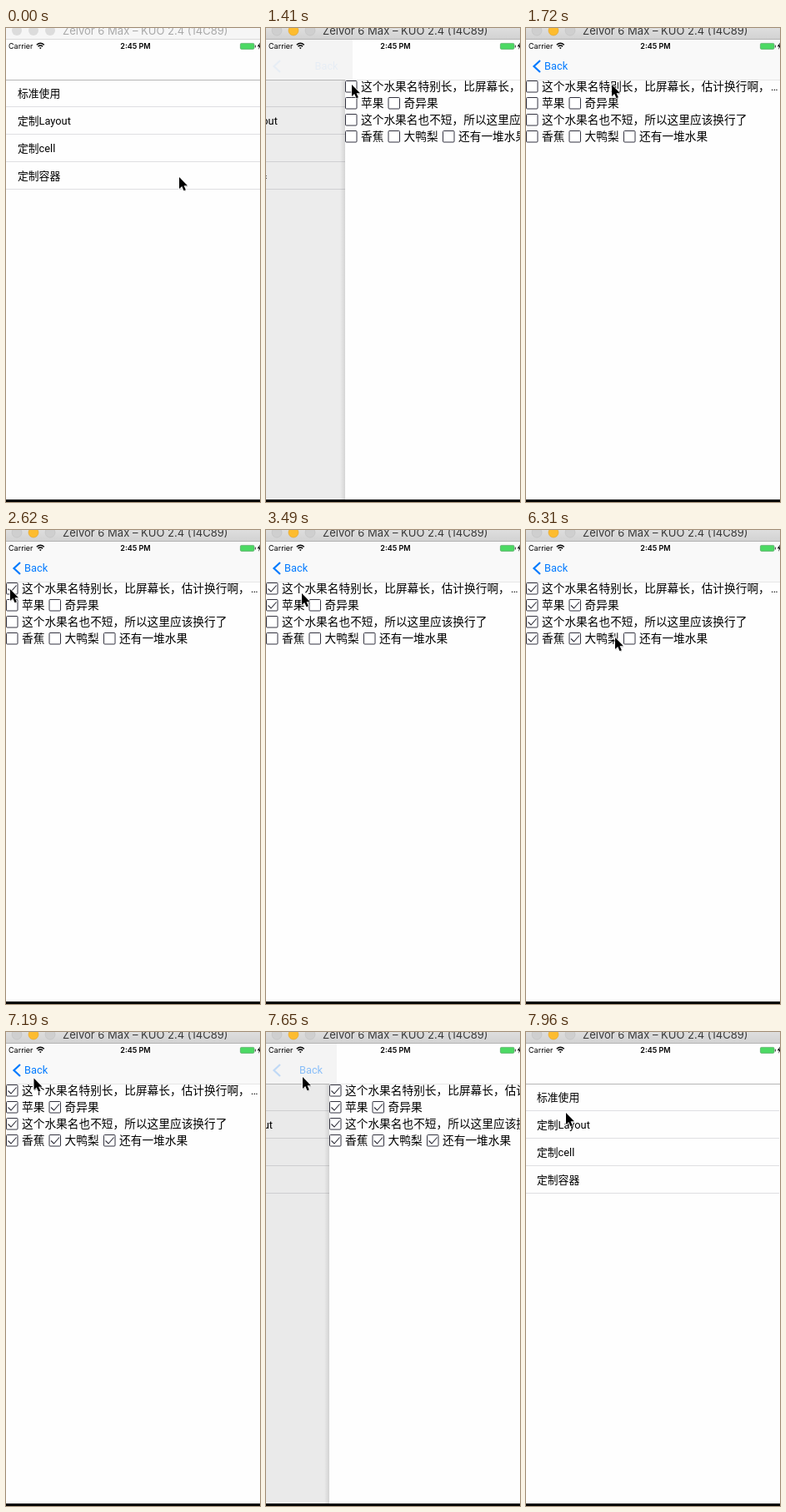
Write an HTML page that moves like this. It is 305x569 px and loops after 8 s.

```html
<!DOCTYPE html>
<html lang="zh">
<head>
<meta charset="utf-8">
<title>Checkbox list demo</title>
<style>
html, body { margin: 0; width: 100%; height: 100%; overflow: hidden; background: #fff; }
svg { display: block; width: 305px; height: 569px; }
text { white-space: pre; }
.ui { font: 12.8px Roboto, "Noto Sans CJK SC", "Noto Sans CJK", sans-serif; }
.item { font: 13.7px "Noto Sans CJK SC", "Noto Sans CJK", sans-serif; }
.status { font: 9px Inter, sans-serif; }
.title { font: 13px Inter, sans-serif; fill: #a9a9a9; }
.lamp { fill: #dcdcdc; }
.bar { fill: #f6f6f6; }
.rim { fill: #dadada; }
.active .title { fill: #383838; }
.active .bar { fill: url(#chrome); }
.active .rim { fill: #b4b4b4; }
.active .lamp { fill: #cfcfcf; stroke: #c0c0c0; stroke-width: .6; }
.active .mid { fill: #fdbc2f; stroke: #e0a12a; }
.box { fill: #fff; stroke: #333340; }
.tick { fill: none; stroke: #2c2c38; stroke-width: 1.1; }
</style>
</head>
<body>
<svg viewBox="0 0 305 569">
  <defs>
    <linearGradient id="chrome" x2="0" y2="1">
      <stop stop-color="#dedede"/><stop offset="1" stop-color="#d2d2d2"/>
    </linearGradient>
    <linearGradient id="shade">
      <stop stop-color="#000" stop-opacity="0"/><stop offset="1" stop-color="#000" stop-opacity=".1"/>
    </linearGradient>
  </defs>
  <rect width="305" height="569" fill="#fefefe"/>

  <g id="list"></g>
  <rect id="dim" y="63" width="305" height="503"/>
  <rect y="62" width="305" height="1" fill="#b6b6b6"/>

  <g id="page">
    <rect x="-6" y="63" width="6" height="503" fill="url(#shade)"/>
    <rect y="62" width="306" height="504" fill="#fefefe"/>
    <rect y="62" width="306" height="1" fill="#e6e6e6"/>
    <g id="items"></g>
  </g>

  <rect id="navBg" y="14" width="305" height="48" fill="#f9f9f9"/>
  <rect id="navDim" y="14" height="48" opacity=".04"/>
  <path id="chevron" d="M17 39L9.5 46L17 53" fill="none" stroke="#007aff" stroke-width="2.2"/>
  <text id="back" class="ui" x="22" y="50" fill="#007aff">Back</text>

  <g class="status">
    <text x="3" y="25">Carrier</text>
    <text x="155.5" y="25" text-anchor="middle" font-weight="600">2:45 PM</text>
  </g>
  <g fill="none" stroke="#000" stroke-width="1.4">
    <path d="M36.8 20.2Q41.3 16.2 45.8 20.2M38.5 22.1Q41.3 19.7 44.1 22.1"/>
    <path d="M41.3 25.2L39.9 23.7Q41.3 22.6 42.7 23.7Z" fill="#000" stroke="none"/>
  </g>
  <rect x="281.4" y="18.4" width="16.6" height="7" rx="1.3" fill="#4cd964" stroke="#58a866" stroke-width=".7"/>
  <rect x="298.8" y="20.5" width="1.2" height="3" rx=".5" fill="#555"/>
  <path d="M305 17.5L301.8 22.3H304L303 26L306 21.2H304.3Z"/>

  <g id="chromeBar">
    <rect class="bar" width="305" height="13"/>
    <rect class="rim" y="13" width="305" height="1"/>
    <circle class="lamp" cx="13" cy="3" r="6"/>
    <circle class="lamp mid" cx="33" cy="3" r="6"/>
    <circle class="lamp" cx="53" cy="3" r="6"/>
    <text class="title" x="68" y="8">Zelvor 6 Max – KUO 2.4 (14C89)</text>
  </g>
  <rect y="566" width="305" height="3"/>
  <g id="cursor">
    <path d="M.5 1.5V15.5L3.7 12.5L6 17.5L8.3 16.5L6 11.7H10.5Z" opacity=".2"/>
    <path d="M0 0V14L3.2 11L5.5 16.2L7.9 15.2L5.6 10.2H10Z" stroke="#fff" stroke-width="1.4" paint-order="stroke"/>
  </g>
</svg>
<script>
const LOOP = 8000, WIDTH = 305;
const $ = id => document.getElementById(id);

$('list').innerHTML = ['标准使用', '定制Layout', '定制cell', '定制容器'].map((label, i) => {
  const y = 94 + i * 33;
  return `<text class="ui" x="14" y="${y - 11}">${label}</text>
    <rect y="${y}" width="${WIDTH}" height="1" fill="#dfdfe2"/>`;
}).join('');

// x, row, label, time of ticking
const items = [
  [0, 0, '这个水果名特别长，比屏幕长，估计换行啊，', 2620],
  [0, 1, '苹果', 3090],
  [51.5, 1, '奇异果', 3940],
  [0, 2, '这个水果名也不短，所以这里应该换行了', 4770],
  [0, 3, '香蕉', 5250],
  [51.5, 3, '大鸭梨', 5600],
  [117, 3, '还有一堆水果', 6710]
];
$('items').innerHTML = items.map(([x, row, label]) =>
  `<g transform="translate(${x} ${63 + row * 20})">
    <rect class="box" x=".5" y=".5" width="13.5" height="13.5" rx="1"/>
    <path class="tick" d="M2.5 7.5L6 11L12.5 3.5"/>
    <text class="item" x="19" y="12.2">${label}</text>
  </g>`).join('') + '<text class="ui" x="294" y="74.5">…</text>';
const ticks = document.querySelectorAll('.tick');

// start, end, steps, then the points passed on the way
const moves = [
  [350, 820, 8, [150, 108], [95, 52], [103, 68]],
  [1870, 2620, 13, [60, 74], [5, 71]],
  [2680, 2910, 4, [5, 84]],
  [3090, 3490, 7, [8, 85], [43, 76]],
  [3557, 3890, 6, [94, 100], [58, 90]],
  [3940, 4120, 4, [58, 96]],
  [4300, 4480, 4, [10, 107]],
  [4770, 4950, 3, [10, 127]],
  [5250, 5360, 3, [58, 135]],
  [5600, 5780, 3, [58, 131]],
  [6020, 6296, 5, [107, 129]],
  [6365, 6710, 6, [118, 128]],
  [6890, 7300, 8, [75, 90], [30, 56], [44, 54]],
  [7710, 7960, 5, [48, 97]]
];

function along(points, f) {
  const s = Math.min(f, 1) * (points.length - 1);
  const i = Math.min(Math.floor(s), points.length - 2);
  return points[i].map((v, k) => v + (points[i + 1][k] - v) * (s - i));
}

function cursorAt(t) {
  let pos = [208, 179];
  for (const [start, end, steps, ...points] of moves) {
    if (t < start) break;
    const gap = (end - start) / (steps - 1);
    const step = Math.min(steps, Math.floor((t - start) / gap + 1e-6) + 1);
    pos = along([pos, ...points], step / steps);
  }
  return pos;
}

const held = (times, t) => times.reduce((last, s) => s <= t ? s : last, 0);
const pushTimes = [1360, 1410, 1500, 1570, 1640, 1720];
const popTimes = [7600, 7650, 7710, 7770, 7830, 7890, 7960];

function spring(ms) {
  const u = Math.max(0, ms) * .018;
  return 1 - (1 + u) * Math.exp(-u);
}

function draw(t) {
  const popping = t >= popTimes[0];
  const out = popping ? spring(held(popTimes, t) - 7596.7) : 0;
  const shown = popping ? 1 - out
    : t >= 1720 ? 1
    : t >= 1360 ? spring(held(pushTimes, t) - 1277.5) : 0;
  const left = t >= 7960 ? WIDTH : Math.round(WIDTH * (1 - shown));
  const moving = left > 0 && left < WIDTH;

  $('chromeBar').setAttribute('class', t >= 1180 ? 'active' : '');
  $('list').setAttribute('transform', `translate(${-93 * shown})`);
  $('dim').setAttribute('opacity', .105 * shown);
  $('page').setAttribute('transform', `translate(${left})`);
  $('page').style.display = left < WIDTH ? '' : 'none';
  $('navBg').style.display = left === 0 ? '' : 'none';
  $('navDim').setAttribute('width', moving ? left + 9 : 0);

  const shift = popping ? 72 * out : 117 * (1 - shown);
  const fade = popping ? .62 * Math.max(0, 1 - out * 1.2)
    : t >= 7480 ? .62 : Math.max(0, (shown - .67) / .33);
  const visible = t >= 7890 ? 0 : fade;
  $('back').setAttribute('transform', `translate(${shift})`);
  $('back').setAttribute('opacity', visible);
  $('chevron').setAttribute('opacity', popping ? visible * .5 : visible);

  ticks.forEach((tick, i) => tick.style.display = t >= items[i][3] ? '' : 'none');
  $('cursor').setAttribute('transform', `translate(${cursorAt(t)})`);
}

const began = performance.now();
function frame() {
  draw((performance.now() - began) % LOOP);
  requestAnimationFrame(frame);
}
frame();
</script>
</body>
</html>
```
